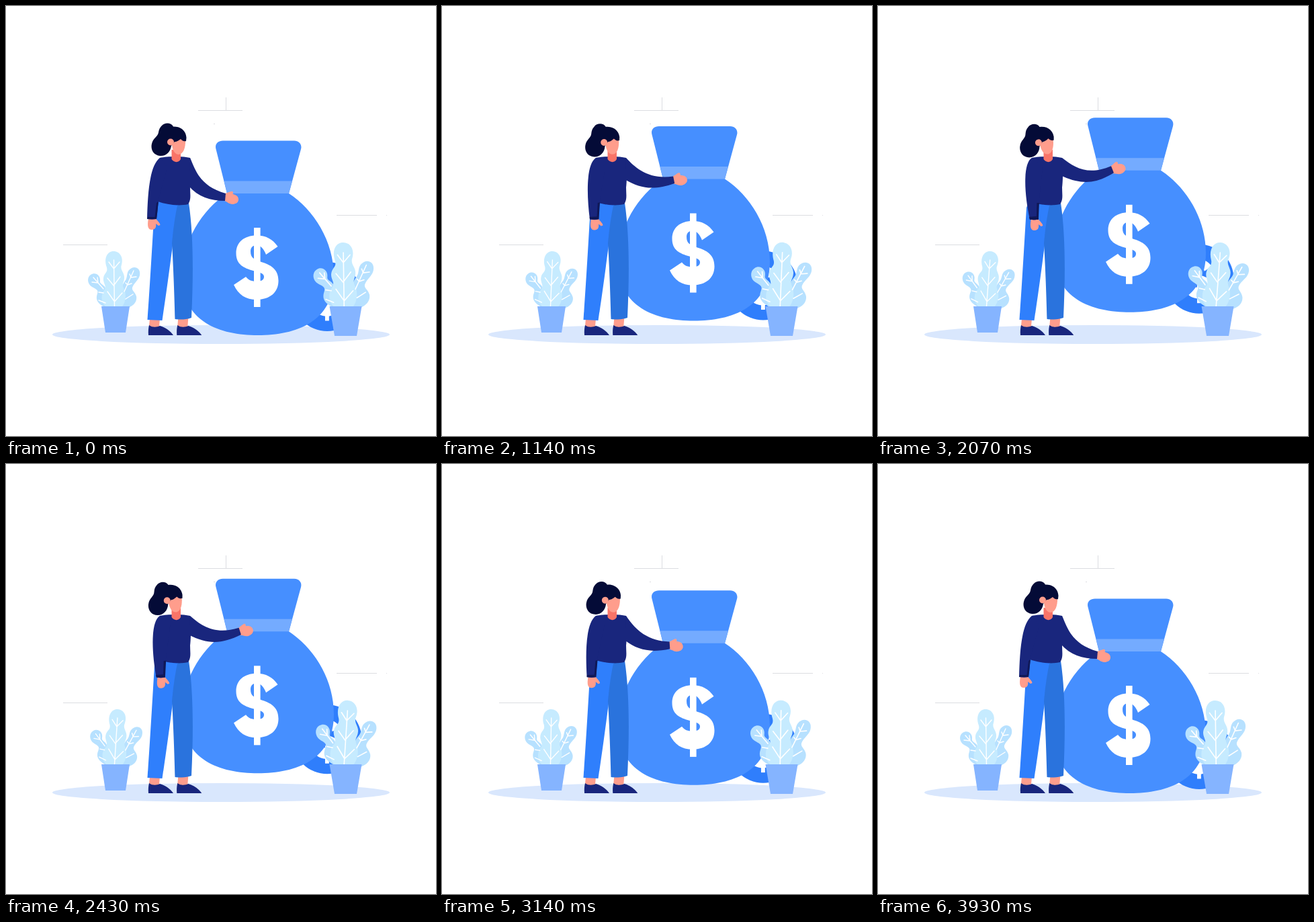
An HTML page that plays this animation: 640x640 px, repeating every 4000 ms.

```html
<!DOCTYPE html>
<html lang="en">
<head>
<meta charset="utf-8">
<title>Savings</title>
<style>
  html, body { margin: 0; width: 100%; height: 100%; overflow: hidden; background: #fff; }
  svg { display: block; width: 100%; height: 100%; }
  .navy { fill: #19267d; }
  .hair { fill: #040b37; }
  .skin { fill: #ff9d8c; }
  .pot { fill: #85b4ff; }
  .veins { fill: none; stroke: #fff; stroke-width: 1.4; stroke-linecap: round; }
  .lines { fill: none; stroke: #dcdde1; stroke-width: 1; }
</style>
</head>
<body>
<svg viewBox="0 0 640 640">
  <defs>
    <!-- Dollar sign centred on the origin -->
    <g id="dollar" fill="#fff">
      <rect x="-5" y="-59" width="9.6" height="118"/>
      <path transform="translate(-374 -389)" d="M404.5 358 C397 347 387 341.5 373 341.5 C354 341.5 342.5 352 342.5 368
        C342.5 385 354 390 368 394 C379 397 384 398 384 403 C384 408 379 410 373 410 C366 410 361 408 357 403
        L339 415 C346 430 357 437 373 437 C393 437 405.5 426 405.5 409 C405.5 391 393 385 380 381
        C369 377 364 375 364 365 C364 359 368 356 373 356 C379 356 384 362 387 370 Z"/>
    </g>
    <!-- Leaves grow from the origin -->
    <g id="leaves">
      <path fill="#b7e1ff" d="M-6 5 C-28 -2 -30 -10 -27 -19 C-25 -25 -30 -26 -35 -29 C-42 -33 -43 -43 -37 -47
        C-30 -52 -22 -46 -23 -38 C-24 -32 -15 -33 -14 -24 C-12 -14 -6 -5 0 5 Z"/>
      <path fill="#b7e1ff" d="M4 5 C22 4 33 -4 31 -15 C29 -22 24 -23 25 -28 C28 -36 34 -38 36 -46
        C38 -56 30 -60 24 -57 C16 -53 18 -46 16 -41 C14 -36 9 -34 10 -24 Z"/>
      <path fill="#c6ebff" d="M-8 5 C-20 0 -24 -14 -17 -24 C-12 -30 -19 -34 -18 -42 C-17 -50 -11 -50 -13 -58
        C-18 -72 -12 -82 -3 -82 C7 -82 12 -72 9 -62 C6 -54 14 -50 13 -42 C13 -36 9 -34 12 -27 C17 -18 16 -4 6 5 Z"/>
      <path class="veins" d="M-2.500 -69 L-1.500 2 M-10 -66 L-2.500 -56 M6 -66 L-2.500 -56 M-12 -42 L-2 -30 M7 -44 L-2 -32
        M-12 -22 L-1.500 -7 M10 -20 L-1.500 -7 M-33 -43 L-18 -26 M-27 -43 L-26 -35 M-35 -36 L-26 -35
        M-25 -21 L-18 -20 M-25 -9 L-15 -5 M27 -53 L13 -22 M21 -48 L23 -43 M31 -44 L23 -43
        M15 -35 L18 -32 M24 -34 L18 -32 M26 -18 L15 -11"/>
    </g>
  </defs>

  <path class="lines" d="M85 355.500 H151 M286 155.500 H352 M327.500 136 V155 M492 311.500 H552 M309 175.500 H311 M566 311.500 H567"/>
  <ellipse cx="320" cy="489" rx="251" ry="14" fill="#d9e7fd"/>

  <g id="coin">
    <circle cx="478" cy="432.500" r="51.500" fill="#2f7efc"/>
    <use href="#dollar" transform="translate(478 432.500) scale(.61)"/>
  </g>

  <g id="bag">
    <path fill="#468fff" d="M329 278 H421 V279 C458 303 488 350 488 402 C488 470 432 490 375 490
      C318 490 262 470 262 402 C262 350 292 303 329 279 Z"/>
    <path fill="#468fff" d="M323 200.500 H429 C436 200.500 441 206 439 213 L421 279 H329 L312.500 213 C310.500 206 315 200.500 323 200.500 Z"/>
    <path fill="#74abff" d="M324.500 260.500 H426 L421 279 H329 Z"/>
    <use href="#dollar" transform="translate(374 389)"/>
  </g>

  <g class="plant" data-x="163" data-scale="1"><use href="#leaves"/></g>
  <path class="pot" d="M142 447 H184 L178 486 H148 Z"/>
  <g class="plant" data-x="505" data-scale="1.160"><use href="#leaves"/></g>
  <path class="pot" d="M481.500 447 H529.500 L522 491 H489 Z"/>

  <g id="foot">
    <path class="skin" d="M214 465 H229 L228 477 C222 481 217 480 213 476 Z"/>
    <path class="navy" d="M213 475 C218 479 225 478 229 476 C237 478 245 484 249 490 H212 C211.500 484 212 479 213 475 Z"/>
  </g>
  <use href="#foot" x="42.300"/>
  <path fill="#2f7ffc" d="M226 288 L258 292 V297 C250 330 246 380 232.500 468 L210.500 467 C214 420 218 350 221 300 Z"/>
  <path fill="#2a73dd" d="M256 293 H272 C279 340 279 400 276 464 C268 467 259 467 251.500 466
    C251 440 249 385 247 353 C249 330 252 310 256 293 Z"/>

  <path id="leftHand" class="skin" d="M212 316 H223 C225 320 229 322 229.500 326 L227 327 L223 324
    C224 329 222 333 217 333 C211 333 210 327 212 316 Z"/>
  <path id="rightHand" class="skin" d="M-1 0 C4 -1 8 -4 10 -3 C12 -2 10 1 11 1 C15 2 19 4 19 9
    C19 14 14 16 10 16 C5 16 2 12 -2 11 Z"/>
  <path class="navy" d="M229 226 C240 223.500 262 223 274 226 C276 240 275 262 274 270 C274 280 276 288 271 295
    C258 298 240 296 226 291 C222 270 222 240 229 226 Z"/>
  <path id="rightArm" class="navy"/>
  <path id="leftArm" class="navy"/>
  <path id="cuff" fill="#0f1858"/>

  <path fill="#f97468" d="M246.500 214 V228 C250 233.500 257 233.500 260 228 V214 Z"/>
  <g id="head">
    <path class="skin" d="M248 195 H267 C268 208 265 220.500 257 221 C251 221 247 214 247 204 Z"/>
    <path class="hair" d="M232 178 C236 173 246 173 249 179.500 C260 179 268 186 268.500 196 L268 201
      C264 202 262 200 260 198 C256 201 254 202 251 202 L246 208 C245 217 238 224 229 223
      C219 222 215 213 217 205 C219 196 226 195 227 188 C228 183 229 181 232 178 Z"/>
    <circle class="skin" cx="245" cy="202.500" r="5"/>
  </g>
</svg>
<script>
const LOOP = 4000, STEPS = 56;
const $ = id => document.getElementById(id);
const place = (el, value) => el.setAttribute('transform', value);
const plants = [...document.querySelectorAll('.plant')];

// Blends two paths that share the same commands
function morph(el, from, to) {
  const ends = to.match(/-?[\d.]+/g).map(Number);
  return p => {
    let i = 0;
    el.setAttribute('d', from.replace(/-?[\d.]+/g, n => +n + (ends[i++] - n) * p));
  };
}

const moveLeftArm = morph($('leftArm'),
  'M229 226 C213 238 211 282 210 317 C215 318 220 318 224 317 C226 305 226 295 227 288 L240 240 Z',
  'M229 226 C215 234 218 282 226 317 C230 319 235 319 239 317 C238 305 239 295 240 288 L245 240 Z');
const moveCuff = morph($('cuff'),
  'M211 314 L221.500 314 L224 293 L227 291 L224 317 L210 317 Z',
  'M225 314 L236 313 L236.500 293 L240 293 L239 318 L226 318 Z');

const mix = (a, b, p) => a + (b - a) * p;

function drawRightArm(p) {
  const bulge = 20 * p * (1 - p);
  const x = mix(327, 347, p) + bulge, y = mix(279, 238, p);
  const bx = mix(326, 351, p) + bulge, by = mix(290, 248, p);
  $('rightArm').setAttribute('d',
    `M274 226 C${mix(282, 292, p)} ${mix(244, 240, p)} ${mix(288, 312, p) + bulge} ${mix(268, 253, p)} ${x} ${y}
     L${bx} ${by} C${mix(304, 325, p)} ${mix(290, 264, p)} ${mix(286, 304, p)} ${mix(284, 267, p)} 272 ${mix(268, 252, p)} Z`);
  place($('rightHand'), `translate(${x} ${y}) rotate(${-22 * p})`);
}

function draw(time) {
  const step = Math.floor((time + 5) % LOOP * STEPS / LOOP);
  const x = 1 - Math.abs(1 - step / (STEPS - 1) * 2);
  const p = x * x * (3 - 2 * x);

  place($('bag'), `translate(0 ${-34.5 * p})`);
  place($('coin'), `translate(0 ${-26.5 * p})`);
  place($('head'), `translate(${-3.5 * p} 0) rotate(${-6 * p} 252 228)`);
  place($('leftHand'), `translate(${16 * p} ${p})`);
  for (const el of plants)
    place(el, `translate(${el.dataset.x} 447) scale(${el.dataset.scale}) rotate(${5.2 * p})`);
  moveLeftArm(p);
  moveCuff(p);
  drawRightArm(p);
}

const start = performance.now();
function tick() {
  draw(performance.now() - start);
  requestAnimationFrame(tick);
}
tick();
</script>
</body>
</html>
```
